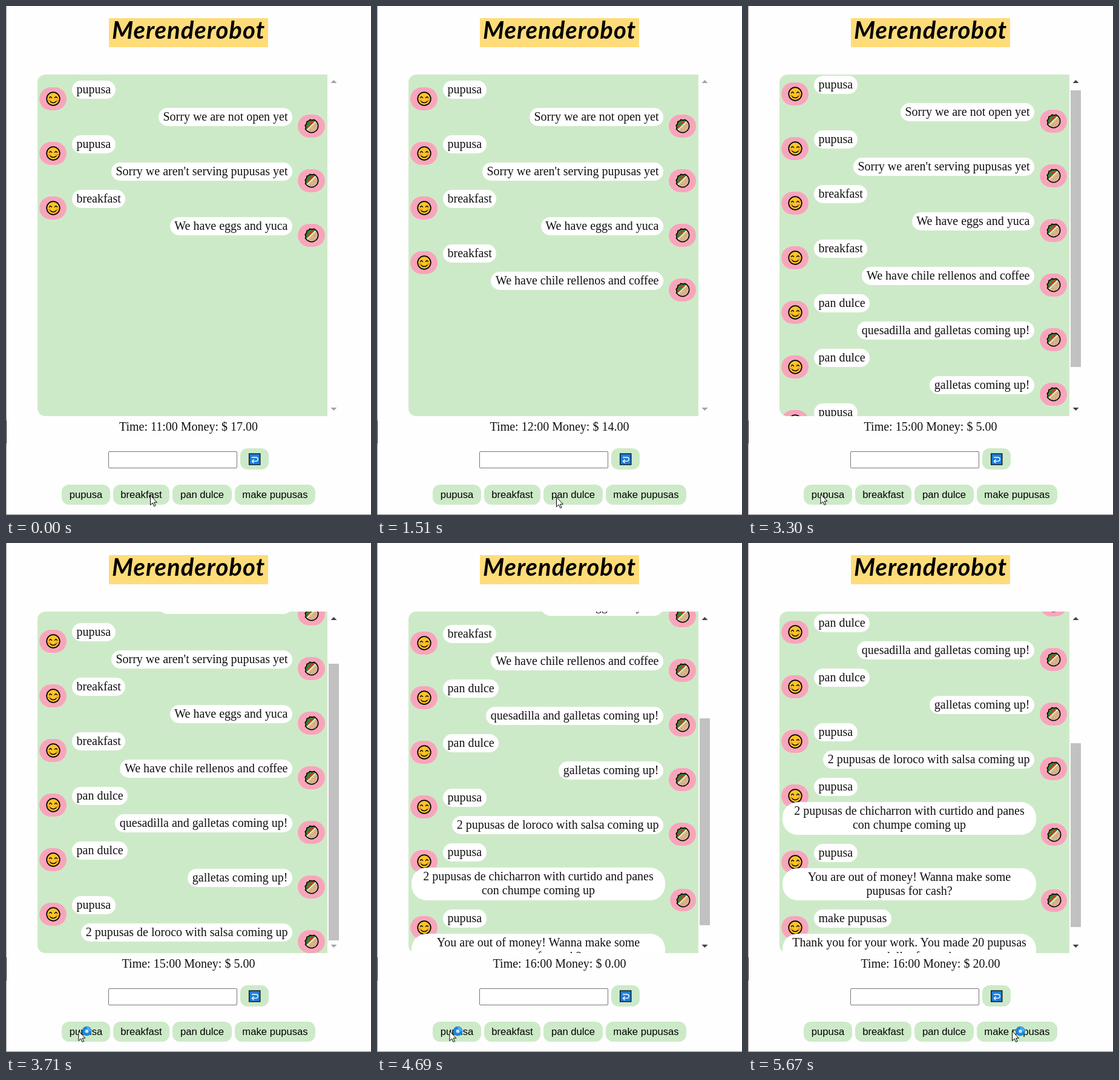
An HTML page for the animation above (5770 ms loop, 603 by 839 pixels).

```html
<!DOCTYPE html>
<html lang="en">
<head>
<meta charset="utf-8">
<title>Food ordering chat bot</title>
<style>
html, body { margin: 0; width: 100%; height: 100%; overflow: hidden; background: #fefefe; }
body { position: relative; font: 20px/28px "Liberation Serif", Times, serif; color: #111; }
div, svg { position: absolute; box-sizing: border-box; }
svg { overflow: visible; }
.edge { left: 0; top: 0; width: 1px; height: 839px; background: linear-gradient(#999 683px, #222 683px 721px, #999 721px); }
.base { left: 0; top: 838px; width: 603px; height: 1px; background: #888; }
.title { left: 170px; top: 20px; width: 263px; height: 48px; background: #ffdc7a; color: #000;
  font: italic bold 40px/39px Lato, sans-serif; letter-spacing: 1px; text-align: center; }
.chat { left: 52px; top: 113px; width: 479px; height: 563px; background: #cdeac8;
  border-radius: 13px 0 0 13px; overflow: hidden; }
.bubble { height: 30px; padding: 0 7.5px; border-radius: 25px; background: #fff; white-space: pre; }
.user { left: 57px; }
.bot { right: 58px; }
.wide { left: 5px; width: 419px; height: 53.5px; padding-top: 3px; line-height: 23px; text-align: center; }
.avatar { width: 45px; height: 38px; border-radius: 19px; background: #f8a5bc; }
.avatar svg { left: 50%; top: 50%; }
.thumb { left: 533px; width: 17px; background: #c1c1c1; }
.status { left: 0; top: 679px; width: 603px; text-align: center; white-space: pre; }
.field { left: 169px; top: 734px; width: 213px; height: 28px; border: 1px solid #767676; border-radius: 2px; background: #fff; }
.btn { top: 789px; height: 33px; border-radius: 12px; background: #cdeac8; color: #000;
  font: 16.67px/33px "Liberation Sans", Arial, sans-serif; text-align: center; }
.send { left: 387px; top: 729px; width: 47px; height: 35px; }
</style>
</head>
<body>
<div class="edge"></div>
<div class="base"></div>
<div class="title">Merenderobot</div>
<div class="chat"><div id="log" style="left:0;top:0;width:479px"></div></div>
<svg width="1" height="1">
  <path id="up" d="M536.5 127l5-5 5 5z"/>
  <path id="down" d="M536.5 662l5 5 5-5z"/>
</svg>
<div class="thumb" id="thumb"></div>
<div class="status" id="status"></div>
<div class="field"></div>
<div class="btn send"><svg style="left:14px;top:8px" width="20" height="20" fill="none">
  <rect x=".7" y="1" width="18" height="18" fill="#2080d8" stroke="#0c1c30" stroke-width="1.5"/>
  <path d="M5 7h7a3.2 3.2 0 0 1 0 6.4H5.5M8.5 10.4l-3 3 3 3" stroke="#fff" stroke-width="1.4"/>
</svg></div>
<div class="btn" style="left:92px;width:80px">pupusa</div>
<div class="btn" style="left:177px;width:93px">breakfast</div>
<div class="btn" style="left:275px;width:98px">pan dulce</div>
<div class="btn" style="left:378px;width:133px">make pupusas</div>
<svg id="cursor" width="1" height="1" style="left:0;top:0">
  <g id="ring"><circle cx="14" cy=".7" r="5.4" fill="#c4e3f8" stroke="#1b86dd" stroke-width="5"/>
    <path d="M14-4.7a5.4 5.4 0 0 1 5.4 5.4" fill="none" stroke="#55b3f2" stroke-width="3"/></g>
  <path id="arrow" d="M.5.5v16l3.7-3.5 2.5 5.5 2.4-1-2.5-5.3h4.8z" fill="#fff" stroke="#000"/>
  <path id="beam" d="M0 .5h2.5l1 1 1-1H7M3.5 1.5v14M0 16.5h2.5l1-1 1 1H7" fill="none" stroke="#000"/>
</svg>
<script>
const $ = id => document.getElementById(id);
const LOOP = 5770, VIEW = 563, EXTRA = 18.5; // EXTRA: added height of a two-line reply

const talk = [
  ['pupusa', 'Sorry we are not open yet'],
  ['pupusa', "Sorry we aren't serving pupusas yet"],
  ['breakfast', 'We have eggs and yuca'],
  ['breakfast', 'We have chile rellenos and coffee'],
  ['pan dulce', 'quesadilla and galletas coming up!'],
  ['pan dulce', 'galletas coming up!'],
  ['pupusa', '2 pupusas de loroco with salsa coming up'],
  ['pupusa', '2 pupusas de chicharron with curtido and panes\ncon chumpe coming up'],
  ['pupusa', 'You are out of money! Wanna make some\npupusas for cash?'],
  ['make pupusas', 'Thank you for your work. You made 20 pupusas\nat a dollar for each'],
];
// money left once that many exchanges are done
const money = { 3: 17, 4: 14, 5: 12, 6: 10, 7: 5, 8: 0, 9: 0, 10: 20 };

// time, exchanges shown, scroll offset
const chatSteps = [
  [0, 3, 0], [790, 4, 0], [1780, 5, 0], [2630, 6, 0], [3300, 7, 8], [3430, 7, 81],
  [4000, 8, 130], [4150, 8, 190], [4690, 9, 258], [4820, 9, 298], [5670, 10, 366],
];
// time, x, y, shape
const cursorSteps = [
  [0, 238, 806, 'arrow'], [1090, 249, 806, 'arrow'], [1240, 276, 800, 'beam'],
  [1380, 288, 808, 'arrow'], [1510, 296, 809, 'arrow'], [2170, 281, 809, 'arrow'],
  [2310, 286, 810, 'arrow'], [2750, 243, 810, 'arrow'], [2900, 144, 807, 'arrow'],
  [3050, 119.5, 804, 'arrow'], [3710, 119.5, 804, 'busy'], [4960, 200, 804, 'busy'],
  [5090, 340, 803, 'busy'], [5210, 436, 802, 'busy'], [5360, 436, 804, 'busy'],
];

const face = `<svg width="1" height="1" fill="none" stroke="#000" stroke-linecap="round">
  <circle r="10.8" fill="#ffc328" stroke-width="1.7"/>
  <path d="M-8 2.5h2.5M5.5 2.5H8" stroke="#f08c2e" stroke-width="2.5"/>
  <path d="M-6.5-1.5q2-3.5 4 0M2.5-1.5q2-3.5 4 0M-5 4.2q5 4.6 10 0" stroke-width="1.4"/></svg>`;
const wrap = `<svg width="1" height="1" stroke-linejoin="round">
  <circle r="10.8" fill="#d9b38c"/>
  <path d="M-8.5 7L-10.5 1-8-6-3-10 4-10.5 7.5-8z" fill="#2f8a35"/>
  <path d="M-8 6.5L7-8" stroke="#f3e2c4" stroke-width="2.2"/>
  <path d="M-7 1.5l2.5-2.5M-3.5-3.5L2-7.5" stroke="#d8321f" stroke-width="3"/>
  <path d="M-2 6h1M4 1h1M3 7h1M7-2h1" stroke="#ad8359" stroke-width="1.2"/>
  <path d="M-8 7.5A10.8 10.8 0 1 0 7.5-8L4-10.7 1-9.7-3-10.6-5-8.5-8-7.5-8.5-4-10.8-1-9.5 2-10.5 5z" fill="none" stroke="#000" stroke-width="1.6"/></svg>`;

const box = (cls, style, html) => `<div class="${cls}" style="${style}">${html}</div>`;

$('log').innerHTML = talk.map(([ask, reply], i) => {
  const wide = i > 6;
  const top = 10 + 90 * i + EXTRA * Math.max(0, i - 7);
  return box('pair', `left:0;top:${top}px;width:479px`,
    box('avatar', 'left:3px;top:11px', face) +
    box('bubble user', 'top:0', ask) +
    box('avatar', wide ? 'left:432px;top:75px;width:43px;height:37px' : 'left:430px;top:56px', wrap) +
    box('bubble ' + (wide ? 'wide' : 'bot'), `top:${wide ? 40 : 45}px`, reply));
}).join('');
const pairs = [...document.querySelectorAll('.pair')];

const at = (steps, t) => steps.filter(s => s[0] <= t).pop();
const show = (el, on) => el.style.display = on ? '' : 'none';

function drawChat(count, scroll) {
  const max = count < 7 ? 0 : Math.round(81 + (90 + EXTRA) * (count - 7));
  const scale = 522 / (VIEW + max);
  pairs.forEach((p, i) => show(p, i < count));
  $('log').style.top = -scroll + 'px';
  show($('thumb'), max > 0);
  $('thumb').style.top = Math.round(133 + scroll * scale) + 'px';
  $('thumb').style.height = Math.round(VIEW * scale) + 'px';
  $('up').style.fill = scroll > 0 ? '#404040' : '#a3a3a3';
  $('down').style.fill = scroll < max ? '#404040' : '#a3a3a3';
  $('status').textContent = `Time: ${Math.min(16, 8 + count)}:00 Money: $ ${money[count].toFixed(2)}`;
}

function drawCursor(x, y, shape) {
  $('cursor').style.transform = `translate(${x}px, ${y}px)`;
  show($('arrow'), shape !== 'beam');
  show($('beam'), shape === 'beam');
  show($('ring'), shape === 'busy');
}

const start = performance.now();
function frame() {
  const t = (performance.now() - start) % LOOP;
  drawChat(...at(chatSteps, t).slice(1));
  drawCursor(...at(cursorSteps, t).slice(1));
  requestAnimationFrame(frame);
}
frame();
</script>
</body>
</html>
```
